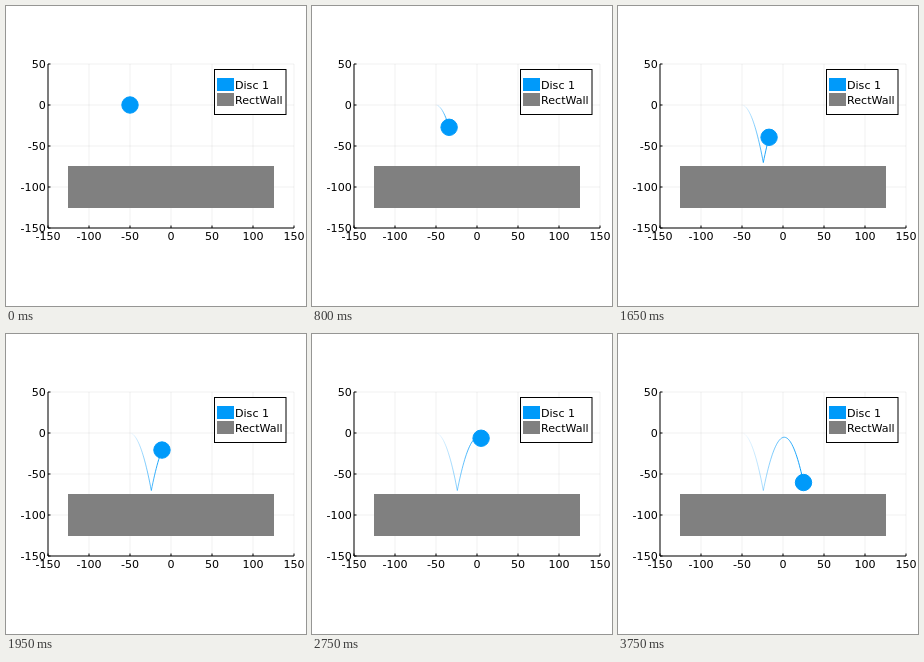
Animation of 300x300 px, one loop 3800 ms. Source, as an HTML page:

```html
<!DOCTYPE html>
<html lang="en">
<head>
<meta charset="utf-8">
<title>Bouncing disc</title>
<style>
  html, body { margin: 0; width: 100%; height: 100%; overflow: hidden; background: #fff; }
  svg { display: block; width: 300px; height: 300px; }
  text { font: 11.1px "DejaVu Sans", sans-serif; }
  .grid { stroke: #000; stroke-opacity: .06; }
  .axis { stroke: #000; fill: none; }
  .disc { fill: #009afa; stroke: #009afa; }
  .wall { fill: #808080; stroke: #808080; }
  #trail { stroke: #009afa; }
</style>
</head>
<body>
<svg viewBox="0 0 300 300">
  <g id="grid" class="grid"></g>
  <g id="axes" class="axis"><path d="M42 58V222H288"/></g>
  <g id="labels"></g>
  <g id="trail"></g>
  <circle id="disc" class="disc" r="8.2"/>
  <rect class="wall" x="62.5" y="160.5" width="205" height="41"/>
  <rect x="208.5" y="63.5" width="71.5" height="45" fill="#fff" stroke="#000"/>
  <rect class="disc" x="211.5" y="72.5" width="16" height="12"/>
  <rect class="wall" x="211.5" y="87.5" width="16" height="12"/>
  <text x="229" y="82.6">Disc 1</text>
  <text x="229" y="97.6">RectWall</text>
</svg>
<script>
const STEP = 50, COUNT = 76, HIT = 26, G = 0.2;
const $ = id => document.getElementById(id);
const px = x => 165 + 0.82 * x;
const py = y => 99 - 0.82 * y;

function add(parent, tag, attrs, text) {
  const el = document.createElementNS("http://www.w3.org/2000/svg", tag);
  for (const k in attrs) el.setAttribute(k, attrs[k]);
  if (text !== undefined) el.textContent = text;
  return $(parent).appendChild(el);
}
const line = (parent, x1, y1, x2, y2) => add(parent, "line", { x1, y1, x2, y2 });

for (let v = -150; v <= 150; v += 50) {
  const x = px(v), y = py(v);
  line("grid", x, 58, x, 222);
  line("axes", x, 222, x, 219.5);
  add("labels", "text", { x, y: 234, "text-anchor": "middle" }, v);
  if (v > 50) continue;
  line("grid", 42, y, 288, y);
  line("axes", 42, y, 44.5, y);
  add("labels", "text", { x: 39.8, y: y + 4, "text-anchor": "end" }, v);
}

// Free fall in whole steps, reversed once at the wall
function position(n) {
  const fall = k => G / 2 * k * (k + 1);
  const k = n - HIT;
  const y = k <= 0 ? -fall(n) : -fall(HIT) + G * HIT * k - fall(k);
  return [px(n - 50), py(y)];
}

const points = Array.from({ length: COUNT }, (_, n) => position(n));
const segments = points.slice(1).map((p, i) => line("trail", ...points[i], ...p));

let shown = -1;
function draw(now) {
  const n = Math.floor(now / STEP) % COUNT;
  if (n !== shown) {
    shown = n;
    $("disc").setAttribute("cx", points[n][0]);
    $("disc").setAttribute("cy", points[n][1]);
    segments.forEach((s, i) => s.setAttribute("stroke-opacity", i < n ? (i + 0.5) / n : 0));
  }
}

const start = performance.now();
function tick() {
  draw(performance.now() - start);
  requestAnimationFrame(tick);
}
tick();
</script>
</body>
</html>
```
